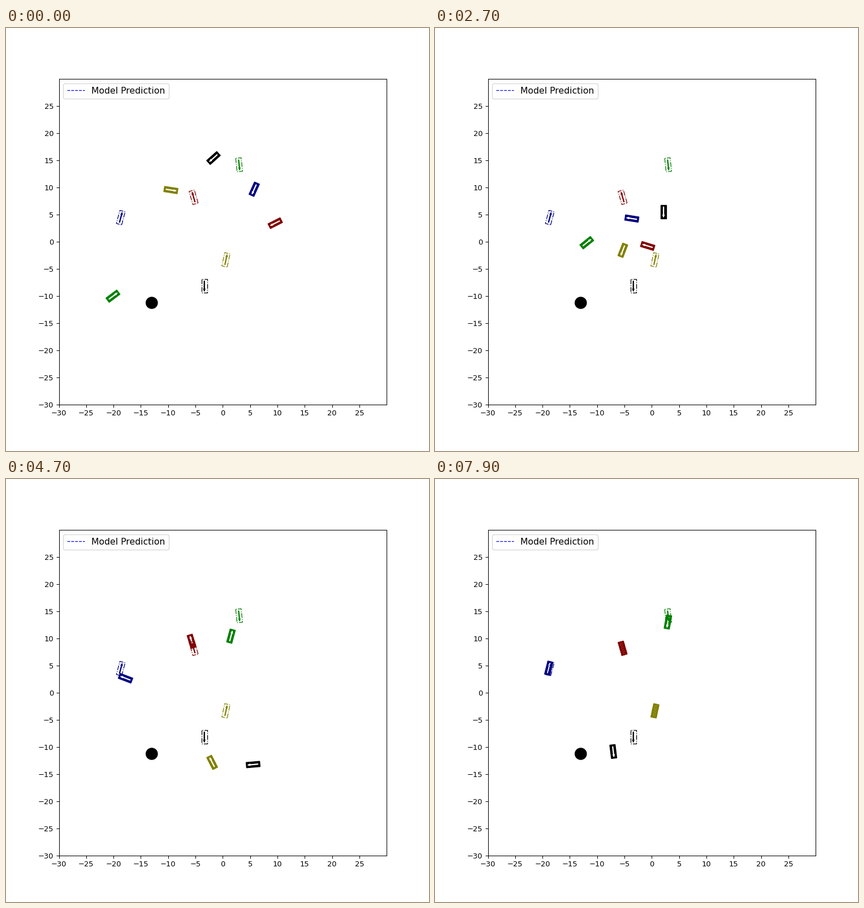
Recreate the animation shown at these times as a matplotlib script. Size 748 by 748 pixels, loop 8000 ms.

```python
import numpy as np
import matplotlib.pyplot as plt
from matplotlib.animation import FuncAnimation
from matplotlib.patches import Circle, FancyArrow, Rectangle
from matplotlib.transforms import Affine2D

SIZE, INCHES = 748, 8
FRAMES, INTERVAL = 80, 100
LENGTH, WIDTH = 2.5, 1.0

# Parking pose of each car: x, y, heading in degrees
goals = {
    "maroon": (-5.34, 8.17, 106),
    "navy": (-18.67, 4.42, 75),
    "green": (2.99, 14.16, 276),
    "olive": (0.58, -3.36, 78),
    "black": (-3.38, -8.15, 270),
}

# Poses passed at the shared beats; the curves between them follow from the headings
BEATS = (1, 11, 27, 35, 47, 64, 79)
routes = {
    "maroon": [(9.6, 3.4, 207), (7.5, 3.05, 181), (-0.75, -0.8, 163),
               (-3.45, 4.45, 100), (-5.7, 9.45, 107), goals["maroon"]],
    "navy": [(5.75, 9.65, 246), (4.15, 8.3, 198), (-3.65, 4.25, 171),
             (-9.35, 7.7, 195), (-17.8, 2.65, 159), (-18.9, 5.3, 81), (-18.85, 4.5, 76)],
    "green": [(-20.1, -10.05, 37), (-19, -8.25, 65), (-11.9, -0.2, 39),
              (-5.85, 0.3, -45), (1.5, 10.4, 75), (3.5, 14.05, -131), (2.95, 13, -100)],
    "olive": [(-9.5, 9.5, -9), (-7.7, 8.4, -47), (-5.3, -1.6, -111),
              (-2, -6.5, -35), (-1.95, -12.85, 117), (0.6, -3.75, 86), goals["olive"]],
    "black": [(-1.7, 15.4, 222), (-2.5, 13.5, 263), (2.15, 5.5, 270),
              (1.1, -2.65, 272), (5.55, -13.25, 185), (-6.85, -7.5, 223), (-7.05, -10.85, 277)],
}
detours = {"green": (58, 4.15, 16.75, -15), "black": (55, -1.15, -11.3, 150)}


def hermite(u, a, b, da, db):
    return ((1 + 2 * u) * (1 - u) ** 2 * a + u * (1 - u) ** 2 * da
            + u * u * (3 - 2 * u) * b + u * u * (u - 1) * db)


def hermite_slope(u, a, b, da, db):
    return (6 * u * (1 - u) * (b - a) + (1 - u) * (1 - 3 * u) * da
            + u * (3 * u - 2) * db)


class Route:
    """A car that always points along its path and reverses when the next pose is behind it."""

    def __init__(self, keys):
        keys = np.array(sorted(keys), float)
        self.times, self.points = keys[:, 0], keys[:, 1:3]
        angles = np.radians(keys[:, 3])
        self.aims = np.column_stack([np.cos(angles), np.sin(angles)])

        steps = np.diff(self.points, axis=0)
        turns = np.angle(np.exp(1j * np.diff(angles)))
        self.gear = np.where((steps * self.aims[:-1]).sum(axis=1) < 0, -1, 1)
        self.lengths = np.hypot(*steps.T) / np.cos(turns / 4) ** 2

        # Smooth speed without overshoot, with a stop at every change of gear
        mean = self.lengths / np.diff(self.times)
        self.speeds = np.zeros(len(keys))
        self.speeds[1:-1] = 2 * mean[:-1] * mean[1:] / (mean[:-1] + mean[1:])
        self.speeds[1:-1] *= self.gear[:-1] == self.gear[1:]

    def pose(self, t):
        t = min(t, self.times[-1])
        i = min(np.searchsorted(self.times, t, side="right"), len(self.times) - 1) - 1
        span, length, gear = self.times[i + 1] - self.times[i], self.lengths[i], self.gear[i]
        rate = self.speeds[i:i + 2] * span / length
        u = hermite((t - self.times[i]) / span, 0, 1, *rate)
        curve = (*self.points[i:i + 2], *(self.aims[i:i + 2] * length * gear))
        x, y = hermite(u, *curve)
        dx, dy = hermite_slope(u, *curve) * gear
        return x, y, np.degrees(np.arctan2(dy, dx))


def add_car(body_style, arrow_color, z):
    body = Rectangle((-LENGTH / 2, -WIDTH / 2), LENGTH, WIDTH, lw=1, zorder=z, **body_style)
    arrow = FancyArrow(-0.9, 0, 1.45, 0, width=0.1, lw=1, color=arrow_color, zorder=z + 0.1)
    ax.add_patch(body)
    ax.add_patch(arrow)
    return body, arrow


def place(parts, pose):
    x, y, heading = pose
    move = Affine2D().rotate_deg(heading).translate(x, y) + ax.transData
    for part in parts:
        part.set_transform(move)


fig, ax = plt.subplots(figsize=(INCHES, INCHES), dpi=SIZE / INCHES)
ax.set(xlim=(-30, 30), ylim=(-30, 30))
ax.set_xticks(range(-30, 30, 5))
ax.set_yticks(range(-30, 30, 5))
ax.plot([], [], "b--", lw=1, label="Model Prediction")
ax.legend(loc="upper left", fontsize=12)
ax.add_patch(Circle((-13, -11.28), 1.05, color="black"))

cars = []
for color, poses in routes.items():
    goal = add_car(dict(fill=False, ec=color, ls="-."), color, 2)
    place(goal, goals[color])
    keys = [(beat, *pose) for beat, pose in zip(BEATS, poses)]
    if color in detours:
        keys.append(detours[color])
    cars.append((add_car(dict(color=color), "white", 1), Route(keys)))


def update(frame):
    for parts, route in cars:
        place(parts, route.pose(max(frame, 1)))
    return [part for parts, _ in cars for part in parts]


anim = FuncAnimation(fig, update, frames=FRAMES, interval=INTERVAL, repeat=True, blit=False)
plt.show()
```
